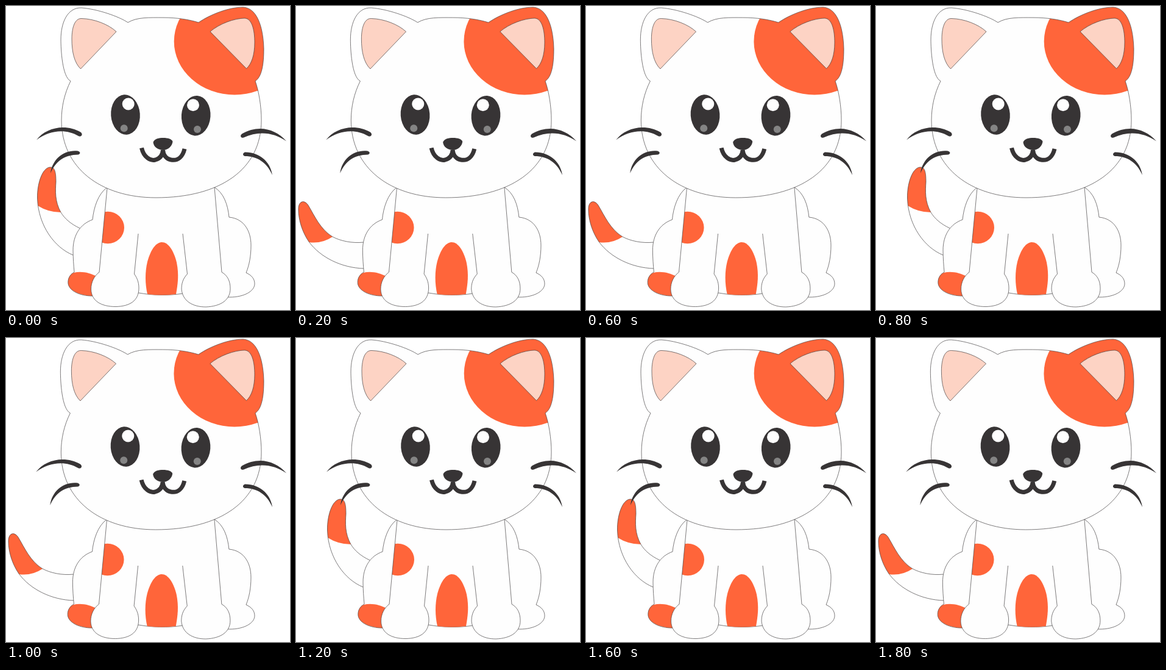
Write an HTML page with a canvas that moves like this. It is 466 px wide and 498 px high and loops after 2000 ms.

```html
<!DOCTYPE html>
<html lang="en">
<head>
<meta charset="utf-8">
<title>Cat wagging its tail</title>
<style>
html, body { margin: 0; width: 100%; height: 100%; overflow: hidden; background: #fff; }
canvas { display: block; }
</style>
</head>
<body>
<canvas id="stage" width="466" height="498"></canvas>
<script>
const ctx = document.getElementById('stage').getContext('2d');
const ORANGE = '#ff653a', WHITE = '#fefefe', DARK = '#373435', PINK = '#fdd3c4', GREY = '#848484';
const STEP = 200;
const path = d => new Path2D(d);

const tails = [
  {
    shape: path('M121 364C106 357 96 348 90 338C80 320 81 303 82 288C82 272 80 264 73 264C60 264 51 290 51.5 315C53 360 80 396 110 408'),
    tip: path('M40 250H100V338H90Q69 338 52 327H40Z')
  },
  {
    shape: path('M111 387C92 389 73 385 60 378C40 366 30 343 21 328C15 317 4 318 4 333C4 350 10 370 21 386C40 412 75 429 111 430'),
    tip: path('M0 310H70L60 378Q42 390 21 387H0Z')
  }
];

const body = path(`M166 297C151 308 144 330 142 350C122 357 110 375 110 400C110 412 111 425 112 436
  C104 440 101 448 102 455C104 467 122 475 141 475L218 470C240 474 265 475 290 471L367 477
  C391 477 408 467 408 455C408 447 403 441 394 437C399 425 402 410 402 392C402 368 390 348 366 346
  C364 325 357 306 342 297Z`);
const foot = path('M111 437C104 440 101 448 102 455C104 467 122 475 145 475L148 443C138 437 124 434 111 437Z');
const belly = path('M232 472C228 455 228 435 232 419C238 397 247 387 256 387C266 387 275 400 280 420C284 440 282 455 279 472Q256 475 232 472Z');
const leftLeg = path('M166 298L153 436C145 442 139.500 452 139.500 464C140 483 156 492.5 180 492.5C203 492 218 483 218 462C218 451 214 444 210.500 439L217 373');
const rightLeg = path('M290 373L297.500 439C290 447 288 455 288 464C290 484 307 493 328 493C352 492 368 482 368 463C368 450 363 441 354 436L342 297');
const head = path(`M106 123C92 116 90 70 90 55C90 27 101 2 124 3C150 5 185 17 200 27
  C215 18 235 19 258 19C280 19 300 22 316 27C335 14 365 2 389 2C411 3 422 32 423 70
  C423 95 420 116 409 123C415 140 419 165 419 187C419 268 351 314 246 314
  C155 314 91 265 91 187C91 165 96 143 106 123Z`);
const ears = [
  path('M122.500 103C112 93 108 75 108 54C108 35 113 20 124 20.500C145 21 168 30 181 42Z'),
  path('M335 42C350 29 375 20 392 20C404 21 408 40 408 60C408 80 403 95 394.500 102.500Z')
];
const nose = path('M241.500 223C244 217 251 216 258 216C266 216 272 218 273.500 222C273 229 266 236 258 236C250 236 242 231 241.500 223Z');
const mouth = path('M222.500 232.500C226 248 237 254 245 252C252 250 257 245 257.500 236C258 245 264 251 271 252C282 254 290 247 293 234');
const whiskers = [
  path('M50 219.500C65 199 98 192 123 207C127 211 123 215 119 213C98 201 72 203 50 219.500Z'),
  path('M73 274C76 250 96 235 118 237.500C123 239 122 243 118 243.500C97 244 82 253 73 274Z'),
  path('M460 221.500C442 201 414 194 387 209.500C383 213 386 217 390 215.500C414 204 440 207 460 221.500Z'),
  path('M437 277C434 254 414 239 392 239.500C388 241 388 245 392 246C412 246 428 256 437 277Z')
];

function fill(shape, color) {
  ctx.fillStyle = color;
  ctx.fill(shape);
}

function outline(shape) {
  ctx.strokeStyle = DARK;
  ctx.lineWidth = 0.65;
  ctx.stroke(shape);
}

function shade(shape, color) {
  fill(shape, color);
  outline(shape);
}

function ellipse(x, y, rx, ry, color, tilt = 0) {
  const oval = new Path2D();
  oval.ellipse(x, y, rx, ry, tilt, 0, Math.PI * 2);
  fill(oval, color);
}

function clipped(shape, paint) {
  ctx.save();
  ctx.clip(shape);
  paint();
  ctx.restore();
}

function drawTail({ shape, tip }) {
  fill(shape, WHITE);
  clipped(shape, () => fill(tip, ORANGE));
  outline(shape);
}

function drawBody() {
  fill(body, WHITE);
  fill(foot, ORANGE);
  outline(body);
  fill(belly, ORANGE);
  fill(leftLeg, WHITE);
  clipped(leftLeg, () => ellipse(167, 363, 27, 26.300, ORANGE));
  outline(leftLeg);
  shade(rightLeg, WHITE);
}

function drawEye(x, y, side) {
  ellipse(x, y, 23.800, 32.800, DARK, -0.07 * side);
  ellipse(x + side * 4.700, y - 17.5, 10, 10, WHITE);
  ellipse(x - side * 2.3, y + 22.3, 6, 6, GREY);
}

function drawHead() {
  fill(head, WHITE);
  clipped(head, () => ellipse(375, 58, 99.300, 87.500, ORANGE));
  outline(head);
  ears.forEach(ear => shade(ear, PINK));
  drawEye(196, 178, 1);
  drawEye(311.700, 179.700, -1);
  fill(nose, DARK);
  ctx.strokeStyle = DARK;
  ctx.lineWidth = 7;
  ctx.stroke(mouth);
  whiskers.forEach(whisker => fill(whisker, DARK));
}

function frame(now) {
  const pose = Math.floor(now / STEP) % 2;
  ctx.setTransform(1, 0, 0, 1, 0, 0);
  ctx.fillStyle = '#fff';
  ctx.fillRect(0, 0, 466, 498);
  drawTail(tails[pose]);
  // The lowered pose is a hair wider towards the left.
  if (pose) ctx.setTransform(1.002, 0, 0, 1, -0.84, 0);
  drawBody();
  drawHead();
}

const start = performance.now();
function tick() {
  frame(performance.now() - start);
  requestAnimationFrame(tick);
}
tick();
</script>
</body>
</html>
```
